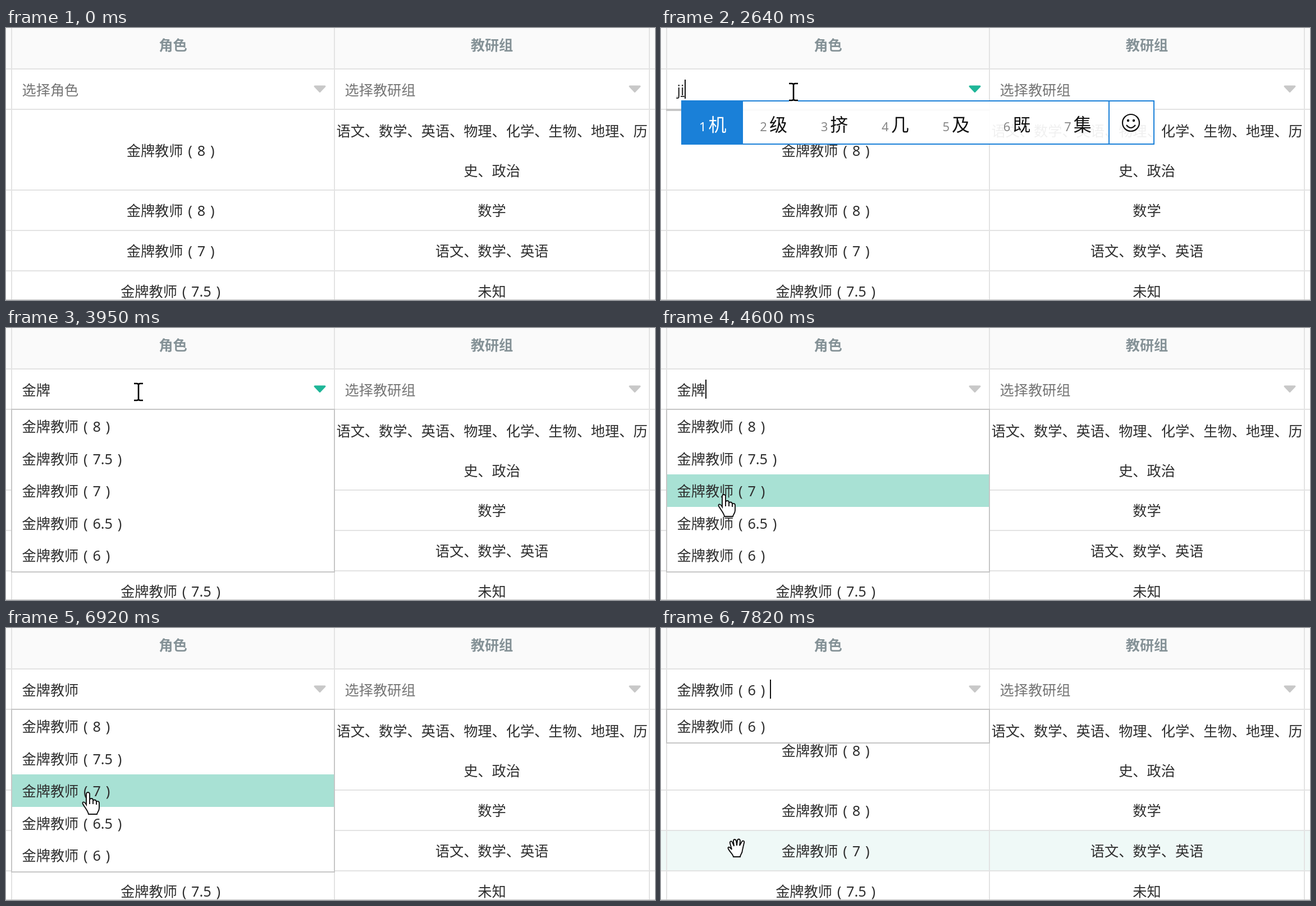
An HTML page that plays this animation: 1156 px wide and 485 px high, repeating every 8 s.

```html
<!DOCTYPE html>
<html lang="zh-CN">
<head>
<meta charset="utf-8">
<style>
html, body { margin: 0; width: 100%; height: 100%; overflow: hidden; background: #fff; }
#stage { position: relative; width: 1156px; height: 485px; overflow: hidden;
  font: 25.2px/40px "Noto Sans", "Noto Sans CJK SC", sans-serif; color: #2e2e2e; white-space: pre; }
#stage div, #stage svg { position: absolute; }
.text.mid { transform: translateX(-50%); }
.head { font-weight: bold; color: #859297; }
.hint { color: #757575; }
.typing { text-decoration: underline; text-decoration-thickness: 2px; }
.paren { display: inline-block; width: 1em; text-align: center; }
.caret { position: absolute; top: 2px; width: 2px; height: 34px; background: #111; }
#stage .list { left: 9px; top: 144px; width: 573px; border: 2px solid #c6c6c6; background: #fff; }
#stage .list div { position: static; height: 57.5px; line-height: 59px; padding-left: 17.5px; }
#stage .list .on { background: #a8e1d4; }
#stage .ime { left: 36px; top: 129px; height: 75px; display: flex; border: 2px solid #1a80d8;
  font-size: 32px; line-height: 81px; color: #111; }
.ime span { padding: 0 29.9px; }
.ime small { font-size: 22px; color: #888; margin-right: 4px; }
.ime .first { background: #1a80d8; color: #fff; }
.ime .first small { color: #fff; }
.ime .smile { width: 78px; border-left: 2px solid #1a80d8; }
</style>
</head>
<body>
<div id="stage"></div>
<script>
const LOOP = 8000, ROW = 72, ITEM = 57.5, BLINK = 490;
const stage = document.getElementById('stage');
const role = n => `金牌教师（${n}）`;
const roles = [8, 7.5, 7, 6.5, 6].map(role);

const rows = [
  { level: 8, groups: ['语文、数学、英语、物理、化学、生物、地理、历', '史、政治'] },
  { level: 8, groups: ['数学'] },
  { level: 7, groups: ['语文、数学、英语'] },
  { level: 7.5, groups: ['未知'] }
];
let nextTop = 2 * ROW;
for (const row of rows) {
  row.top = nextTop;
  row.height = ROW * row.groups.length;
  nextTop += row.height;
}

// Edits of the filter field: time, value, input method candidates
const keystrokes = ['j', 'ji', 'jin', "jin'p", "jin'pa", "jin'pai"];
const candidatesFor = keys =>
  (keys === 'ji' ? '机 级 挤 几 及 既 集' :
   keys.length < 4 ? '金 进 今 近 仅 尽 紧' : '金牌 进牌 紧排 进派 金 进 今').split(' ');
const edits = [
  [1750, ''],
  ...keystrokes.map((keys, i) => [2520 + 110 * i, keys, candidatesFor(keys)]),
  [3390, '金牌'],
  [5000, role(7)],
  ...[5590, 5910, 6060].map((time, i) => [time, role(7).slice(0, -1 - i)]),
  [7480, role(6)]
];

// Pointer stops: time, x, y
const stops = [
  [100, 560, 390], [1530, 236, 114], [4390, 236, 114], [4600, 112, 297],
  [5040, 147, 310], [6600, 147, 310], [6920, 146, 293], [7600, 135, 392]
];

const beam = 'd="M-8-15h5q3 0 3 3q0-3 3-3h5M-8 15h5q3 0 3-3q0 3 3 3h5M0-12V12" fill="none"';
const hand = 'fill="#fff" stroke="#111" stroke-width="1.9"';
const cursors = {
  beam: `<path ${beam} stroke="#fff" stroke-width="5"/><path ${beam} stroke="#000" stroke-width="2.6"/>`,
  point: `<path ${hand} d="M-3 22V3a3 3 0 0 1 6 0V14c0-4 6-4 6 0v2c0-4 6-3 6 1v1c0-3 5-3 5 1v9c0 6-4 8-4 11H1C0 33-5 28-9 21c-2-4 2-6 6 1zM3 14v7M9 16v5M15 18v4"/>`,
  grab: `<path ${hand} d="M-9 3L-12-8c-1-4 3-5 4-2L-5-3-6-12c0-4 4-4 5 0L0-4 1-13c1-4 5-3 5 1L5-4 9-11c2-3 5-1 4 2L10 4C10 10 6 12 6 16H-6C-7 11-12 8-15 2c-2-4 2-5 6 1z"/>`
};

const rich = s => s.replace(/[（）]/g, c => `<span class="paren">${c === '（' ? '(' : ')'}</span>`);
const box = (x, y, w, h, color) =>
  `<div style="left:${x}px;top:${y}px;width:${w}px;height:${h}px;background:${color}"></div>`;
const text = (x, y, html, cls = 'mid') =>
  `<div class="text ${cls}" style="left:${x}px;top:${y - 20}px">${html}</div>`;
const svg = (x, y, content) =>
  `<svg style="left:${x}px;top:${y}px;overflow:visible" width="1" height="1">${content}</svg>`;
const arrow = (x, color) => svg(x, 108,
  `<path d="M-9-4H9L0 5.5Z" fill="${color}" stroke="${color}" stroke-width="3" stroke-linejoin="round"/>`);

function fieldAt(t) {
  const edit = edits.filter(([time]) => time <= t).pop();
  if (!edit) return { value: '' };
  const [time, value, candidates] = edit;
  return {
    value, candidates,
    caret: Math.floor((t - time) / BLINK) % 2 === 0,
    options: candidates ? [] : roles.filter(r => r.includes(value))
  };
}

// Eased glide between stops; "moved" is the last moment the pointer was in motion
function pointerAt(t) {
  const i = stops.filter(([time]) => time <= t).length - 1;
  if (i < 0) return null;
  const [t0, x0, y0] = stops[i];
  const [t1, x1, y1] = stops[i + 1] || stops[i];
  if (x0 === x1 && y0 === y1) return { x: x0, y: y0, moved: t0 };
  const p = (t - t0) / (t1 - t0), ease = p * (2 - p);
  return { x: x0 + (x1 - x0) * ease, y: y0 + (y1 - y0) * ease, moved: t };
}

// Hover only changes while the pointer moves
function hitTest(pointer) {
  if (!pointer) return {};
  const { x, y, moved } = pointer;
  if (y < 2 * ROW + 2) return { cursor: 'beam', filter: true };
  const { options } = fieldAt(moved);
  const item = Math.floor((y - 2 * ROW - 2) / ITEM);
  if (options && item < options.length) return { cursor: 'point', item };
  return { cursor: 'grab', row: rows.find(r => y < r.top + r.height) };
}

function table(hit) {
  let html = box(0, 0, 1156, ROW, '#fafafa');
  if (hit.row) html += box(0, hit.row.top, 1156, hit.row.height, '#eff9f7');
  for (const x of [9, 584, 1145]) html += box(x, 0, 2, 485, '#e3e3e3');
  for (const y of [ROW, ...rows.map(r => r.top)]) html += box(0, y, 1156, 2, '#e3e3e3');
  html += box(0, 484, 1156, 1, '#c4c4c4');
  html += text(297.5, 30, '角色', 'mid head') + text(865.5, 30, '教研组', 'mid head');
  for (const { level, groups, top, height } of rows) {
    const center = Math.round(top + height * 0.515);
    html += text(297.5, center, rich(role(level)));
    groups.forEach((line, i) => {
      html += text(865.5, center + 71 * (i - (groups.length - 1) / 2), line);
    });
  }
  return html + text(603.5, 110, '选择教研组', 'hint') + arrow(1120, '#c8c8c8') +
    arrow(559, hit.filter ? '#1fb698' : '#c8c8c8');
}

function input({ value, candidates, caret }) {
  const mark = caret ? '<span class="caret"></span>' : '';
  if (!value) return text(28.5, 110, mark + '选择角色', 'hint');
  const shown = candidates ? `<span class="typing">${value}</span>` : rich(value);
  return text(28.5, 110, shown + mark, '');
}

function dropdown({ options }, hit) {
  if (!options) return '';
  return '<div class="list">' + options.map((s, i) =>
    `<div class="${i === hit.item ? 'on' : ''}">${rich(s)}</div>`).join('') + '</div>';
}

function ime({ candidates }, t) {
  if (!candidates) return '';
  const cells = candidates.map((s, i) =>
    `<span class="${i ? '' : 'first'}"><small>${i + 1}</small>${s}</span>`).join('');
  const smile = '<g fill="none" stroke="#111" stroke-width="2.2"><circle r="15"/><path d="M-8 4Q0 14 8 4"/></g>' +
    '<circle cx="-5" cy="-4" r="2.2"/><circle cx="5" cy="-4" r="2.2"/>';
  const alpha = Math.min(1, 0.86 + (t - 2520) / 1700);
  return `<div class="ime" style="background:rgba(255,255,255,${alpha})">${cells}<b class="smile">` +
    `<svg style="margin-left:38px;top:38px;overflow:visible" width="1" height="1">${smile}</svg></b></div>`;
}

let drawn = '';
const start = performance.now();
function render() {
  const t = (performance.now() - start) % LOOP;
  const field = fieldAt(t);
  const pointer = pointerAt(t);
  const hit = hitTest(pointer);
  const html = table(hit) + input(field) + dropdown(field, hit) + ime(field, t) +
    (pointer ? svg(pointer.x, pointer.y, cursors[hit.cursor]) : '');
  if (html !== drawn) stage.innerHTML = drawn = html;
  requestAnimationFrame(render);
}
render();
</script>
</body>
</html>
```
